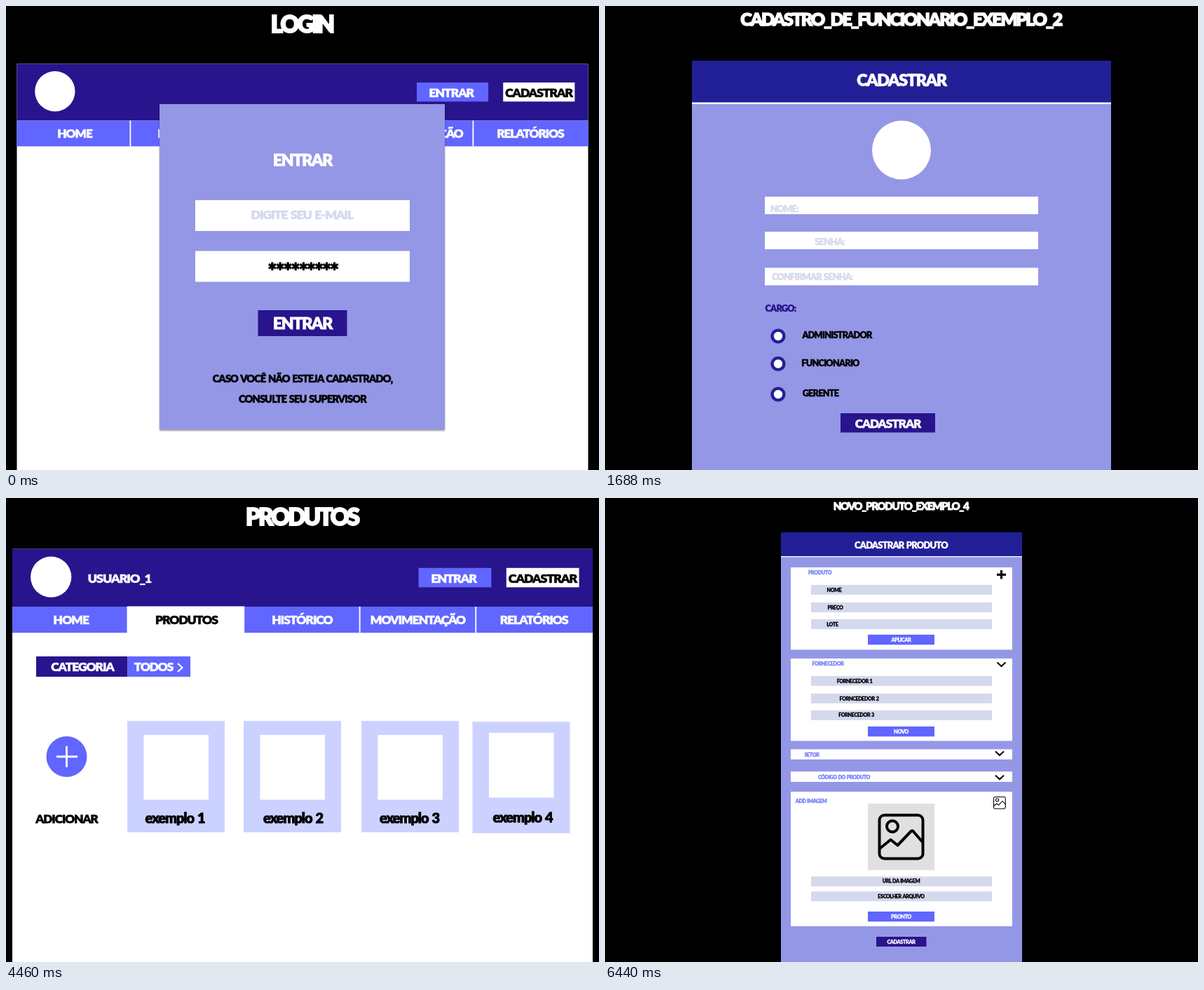
An HTML page that plays this animation: 846 by 662 pixels, repeating every 8 s.

```html
<!DOCTYPE html>
<html lang="pt">
<head>
<meta charset="utf-8">
<style>
html, body { margin: 0; width: 100%; height: 100%; overflow: hidden; background: #000; }
svg { display: block; width: 846px; height: 662px; }
text { font-family: Lato, "Open Sans", sans-serif; font-weight: 900; letter-spacing: -.055em; word-spacing: .07em; text-anchor: middle; stroke-width: .035em; }
.title { letter-spacing: -.09em; stroke-width: .055em; }
.prose { letter-spacing: -.008em; word-spacing: 0; }
</style>
</head>
<body>
<svg id="stage" viewBox="0 0 846 662">
  <defs>
    <filter id="soft"><feGaussianBlur stdDeviation="0.6"/></filter>
    <filter id="shade" x="-5%" y="-5%" width="110%" height="110%"><feDropShadow dx="0" dy="2" stdDeviation="1.2" flood-opacity=".4"/></filter>
    <linearGradient id="floor" x1="0" y1="0" x2="0" y2="1">
      <stop offset="0" stop-color="#d3bda8"/><stop offset=".35" stop-color="#b39a86"/><stop offset="1" stop-color="#8d7260"/>
    </linearGradient>
    <clipPath id="frame"><rect width="292" height="229"/></clipPath>
  </defs>
</svg>
<script>
const NAVY = '#28148c', INK = '#222096', BLUE = '#6066ff', LILAC = '#9497e6',
      PALE = '#ccd2ff', FIELD = '#d5d9ed', LABEL = '#727ff5', WHITE = '#fff', BLACK = '#000';
const LOOP = 8000;
const CUTS = [0, 500, 2480, 4460, 6440];

// Edges are given as left, top, right, bottom
const box = (l, t, r, b, fill, more = '') =>
  `<rect x="${l}" y="${t}" width="${r - l}" height="${b - t}" fill="${fill}" ${more}/>`;
const dot = (x, y, r, fill, more = '') => `<circle cx="${x}" cy="${y}" r="${r}" fill="${fill}" ${more}/>`;
const text = (x, y, str, size, fill = BLACK, more = '') =>
  `<text x="${x}" y="${y}" font-size="${size}" fill="${fill}" stroke="${fill}" ${more}>${str}</text>`;
const title = (y, str, size) => text(422, y, str, size, WHITE, 'class="title"');
const line = (d, color, width, more = '') =>
  `<path d="${d}" fill="none" stroke="${color}" stroke-width="${width}" ${more}/>`;
const shape = (points, fill) => `<polygon points="${points}" fill="${fill}"/>`;
const group = (more, ...parts) => `<g ${more}>${parts.join('')}</g>`;

// Site header with tabs, laid out 810 units wide
function site(x, y, width, active) {
  const tabs = ['HOME', 'PRODUTOS', 'HISTÓRICO', 'MOVIMENTAÇÃO', 'RELATÓRIOS'];
  const mids = [82, 243, 404.5, 566, 728];
  const out = [
    box(0, 0, 810, 720, WHITE), box(0, 0, 810, 80.5, NAVY), box(0, 80.5, 810, 117, BLUE),
    dot(54, 39, 28.5, WHITE),
    box(567, 26.5, 668.5, 53.5, BLUE), text(616, 47.5, 'ENTRAR', 17.3, WHITE),
    box(689.5, 26.5, 791, 53.5, WHITE), text(740, 47.5, 'CADASTRAR', 17.3)
  ];
  for (let i = 1; i < 5; i++) out.push(box(i * 162 - 2, 80.5, i * 162 - .2, 117, WHITE));
  if (active >= 0) out.push(box(active * 162 - (active ? 1.5 : 0), 80, active * 162 + 162, 118, WHITE));
  tabs.forEach((name, i) => out.push(text(mids[i], 104.5, name, 17, i === active ? BLACK : WHITE)));
  return group(`transform="translate(${x} ${y}) scale(${width / 810})"`, ...out);
}

function login() {
  return title(38, 'LOGIN', 33) +
    group('filter="url(#soft)"', site(15.5, 82.5, 815, -1)) +
    box(219, 140, 626, 604, LILAC, 'filter="url(#shade)"') +
    text(423, 228, 'ENTRAR', 23, WHITE) +
    box(270, 277, 576, 321, WHITE) + text(422.5, 304, 'DIGITE SEU E-MAIL', 17.6, FIELD) +
    box(270, 349.5, 576, 393.5, WHITE) + text(423.5, 389, '*********', 30) +
    box(359.5, 434, 486.5, 471, NAVY) + text(423, 461, 'ENTRAR', 23, WHITE) +
    text(423, 537, 'CASO VOCÊ NÃO ESTEJA CADASTRADO,', 14.5) +
    text(423, 566, 'CONSULTE SEU SUPERVISOR', 14.5);
}

function signup() {
  const roles = [['ADMINISTRADOR', 331, 471, 474], ['FUNCIONARIO', 321.5, 510.5, 513.5], ['GERENTE', 307.5, 554, 557]];
  return title(28, 'CADASTRO_DE_FUNCIONARIO_EXEMPLO_2', 25.2) +
    box(124, 78, 722, 662, LILAC) + box(124, 78, 722, 138, INK) + box(124, 137.5, 722, 140, WHITE) +
    text(423, 113.5, 'CADASTRAR', 23.2, WHITE) + dot(423, 205.5, 42, WHITE) +
    box(228, 272, 618, 297, WHITE) + text(256, 294, 'NOME:', 12.8, FIELD) +
    box(228, 322, 618, 347, WHITE) + text(320.5, 340.5, 'SENHA:', 12.8, FIELD) +
    box(228, 373.5, 618, 398.5, WHITE) + text(296, 391, 'CONFIRMAR SENHA:', 12.6, FIELD) +
    text(250.5, 435.5, 'CARGO:', 12.6, NAVY) +
    roles.map(([name, x, cy, y]) =>
      dot(247, cy, 8.4, WHITE, `stroke="${INK}" stroke-width="4.4"`) + text(x, y, name, 12.6)).join('') +
    box(336, 581, 471, 608.5, NAVY) + text(403.5, 601.5, 'CADASTRAR', 17, WHITE);
}

// Warehouse aisle in flat shapes
function warehouse() {
  const out = [
    box(0, 0, 292, 229, '#3d2f27'),
    shape('38,0 246,0 180,74 106,74', '#ecd9c8'),
    shape('106,150 180,150 258,229 30,229', 'url(#floor)'),
    shape('142,156 178,156 184,164 138,164', '#f6eee4')
  ];
  for (const x of [66, 104, 142, 180, 218]) out.push(line(`M${x} 0L${142 + (x - 142) * .4} 72`, '#c39a80', 1.2));
  for (let i = 0; i < 5; i++) {
    const y = 6 + i * 14.5, pad = 44 + i * 14;
    out.push(line(`M${pad} ${y}H${286 - pad}`, i % 2 ? '#a9502c' : '#b98468', 3.6 - i * .3));
  }
  out.push(box(106, 70, 180, 152, '#d9c3a8'), box(106, 74, 132, 152, '#8d6239'), box(162, 74, 180, 152, '#8d6239'),
    box(134, 76, 160, 98, '#f4eee6'), box(134, 106, 160, 120, '#efe6d9'), box(132, 124, 158, 150, '#b98856'),
    box(106, 101, 180, 105, '#2a72b4'));

  // Racks shrink towards the far end of the aisle
  const depth = f => 106 * (1 - (1 - f) ** 1.5);
  const rack = (edge, sign, tone) => {
    const band = (from, to, near, nearEnd, far, farEnd, fill) => {
      const at = (u, a, b) => a + (b - a) * u / 106;
      out.push(shape([[from, near, far], [to, near, far], [to, nearEnd, farEnd], [from, nearEnd, farEnd]]
        .map(([u, a, b]) => `${edge + sign * u},${at(u, a, b)}`).join(' '), fill));
    };
    band(0, 48, 117, 140, 106, 118, '#e6ddd2');
    for (let i = 0; i < 7; i++) {
      const from = depth(i / 7), to = depth((i + .9) / 7);
      const wood = k => `hsl(28 ${44 + (i + k) % 3 * 5}% ${tone + (i * 5 + k * 7) % 4 * 5}%)`;
      band(from, to, -46, -2, 60, 70, wood(0));
      band(from, to, 34, 64, 78, 88, wood(1));
      band(from, to, 66, 104, 89, 100, wood(2));
      band(from, to, 140, 176, 116, 132, wood(3));
      band(from, to, 178, 216, 133, 148, wood(4));
    }
    band(0, 106, 6, 14, 70, 74, '#4179a8');
    band(0, 106, 107, 119, 101, 106, '#1d7fd0');
    for (let i = 1; i < 6; i++) {
      const u = depth(i / 6.5), w = 6 - i * .6, foot = 226 - u * .68;
      band(u - w / 2, u + w / 2, 0, foot, 0 + u * .6, foot, '#5d5f62');
      band(u - w / 2, u - w / 2 + 1.3, 0, foot, u * .6, foot, '#a3a39f');
    }
  };
  rack(0, 1, 37);
  rack(292, -1, 42);
  out.push(line('M36 204L78 122M222 188L257 122M36 88L78 40M222 80L257 24', '#85817b', 2.4),
    shape('258,150 292,154 292,229 258,224', '#ecd8ba'), shape('258,150 266,149 292,153 292,168 258,162', '#f6e9d3'));
  return group('transform="translate(43.5 278)" clip-path="url(#frame)"', ...out);
}

function home() {
  const words = ['Este é um site para controle de estoque, onde', 'se reúne várias ferramentas onde se é',
    'possível criar produtos, editar informações de', 'estoque e compactar todas informações',
    'necessárias em um relatório de hisórico blá', 'blá blá...'];
  return title(38, 'HOME', 32) + site(18, 86, 810, 0) + warehouse() +
    text(190, 564.5, 'VENHA PARTICIPAR CONOSCO!', 17.1, NAVY) +
    box(380, 278, 791, 593.5, PALE) + text(584.5, 311, 'HOME', 17, NAVY) +
    words.map((row, i) => text(585, 362 + i * 33.7, row, 19, BLACK, 'class="prose"')).join('');
}

function products() {
  const cards = [[173, 318, 23.5, 20, 241], [339, 318, 23.5, 20, 409.5], [507, 318, 23.5, 20, 575.5], [665.5, 319.3, 23.5, 15.7, 737]];
  return title(39, 'PRODUTOS', 33) + site(9, 72.7, 828, 1) +
    text(162, 121, 'USUARIO_1', 17.8, WHITE) +
    box(43, 226, 173.5, 255, NAVY) + text(109, 247, 'CATEGORIA', 17.3, WHITE) +
    box(173.5, 226, 263, 255, BLUE) + text(210.5, 247, 'TODOS', 17, WHITE) +
    line('M245 236L251.5 242L245 248', WHITE, 2.2) +
    dot(86.5, 369, 29, BLUE) + line('M72 369H102M86.5 354V384', WHITE, 2.8) +
    text(86.5, 464, 'ADICIONAR', 17) +
    cards.map(([x, y, dx, dy, mid], i) =>
      box(x, y, x + 139, y + 159, PALE) + box(x + dx, y + dy, x + dx + 92.5, y + dy + 92.5, WHITE) +
      text(mid, i === 3 ? 463 : 464, `exemplo ${i + 1}`, 20)).join('');
}

// Landscape icon, 66 units square
const picture = (x, y, scale) => group(
  `transform="translate(${x} ${y}) scale(${scale})" fill="none" stroke="#000" stroke-width="4" stroke-linejoin="round"`,
  '<rect x="2" y="2" width="62" height="62" rx="7"/><circle cx="20.5" cy="18" r="8"/>',
  '<path d="M2 50L18 37L28 45L47 25Q49 23 51 26L64 41"/>');

function newProduct() {
  const field = (top, x, name, base) => box(294, top, 552, top + 14, FIELD) + text(x, base, name, 7.2);
  const button = (top, name) => box(375, top, 470, top + 14.3, BLUE) + text(422.5, top + 9.8, name, 7.3, WHITE);
  const head = (x, y, name) => text(x, y, name, 7.2, LABEL);
  const arrow = (x, y) => line(`M${x - 6} ${y - 3}L${x} ${y + 2.6}L${x + 6} ${y - 3}`, BLACK, 2);
  return title(17, 'NOVO_PRODUTO_EXEMPLO_4', 15) +
    box(251, 49, 595, 662, LILAC) + box(251, 49, 595, 83, INK) + box(251, 83, 595, 84.3, WHITE) +
    text(422.5, 72, 'CADASTRAR PRODUTO', 12.8, WHITE) +
    box(265, 99, 581, 216.5, WHITE) + head(306.5, 109, 'PRODUTO') +
    line('M559 109.3H572M565.5 103V115.6', BLACK, 3.2) +
    field(124, 327, 'NOME', 133.5) + field(149, 328.5, 'PREÇO', 159) + field(173, 324.5, 'LOTE', 182.5) +
    button(195, 'APLICAR') +
    box(265, 229, 581, 346.5, WHITE) + head(318, 239, 'FORNECEDOR') + arrow(565.5, 237.5) +
    field(254, 356, 'FORNECEDOR 1', 263.5) + field(279, 362.5, 'FORNCEDEDOR 2', 288.5) + field(303, 358.5, 'FORNECEDOR 3', 312.3) +
    button(326, 'NOVO') +
    box(265, 358.5, 581, 373, WHITE) + head(295, 369, 'SETOR') + arrow(563, 364.5) +
    box(265, 390.3, 581, 405, WHITE) + head(341, 400.5, 'CÓDIGO DO PRODUTO') + arrow(563, 398.7) +
    box(265, 419, 581, 611, WHITE) + head(294, 435, 'ADD IMAGEM') + picture(554, 426, .27) +
    box(375, 436, 470, 531, '#e0e0e0') + picture(389.5, 450.5, 1) +
    field(540, 422.5, 'URL DA IMAGEM', 548.5) + field(561.3, 422.5, 'ESCOLHER ARQUIVO', 571) +
    button(590, 'PRONTO') +
    box(387, 626, 458.5, 640, NAVY) + text(422.5, 635.8, 'CADASTRAR', 7.3, WHITE);
}

const stage = document.getElementById('stage');
stage.insertAdjacentHTML('beforeend',
  [login, signup, home, products, newProduct].map(draw => group('class="scene"', draw())).join(''));
const scenes = [...stage.querySelectorAll('.scene')];

function show(now) {
  const t = now % LOOP;
  const current = CUTS.filter(cut => cut <= t).length - 1;
  scenes.forEach((scene, i) => scene.setAttribute('display', i === current ? 'inline' : 'none'));
}

const start = performance.now();
function tick() {
  show(performance.now() - start);
  requestAnimationFrame(tick);
}
tick();
</script>
</body>
</html>
```
